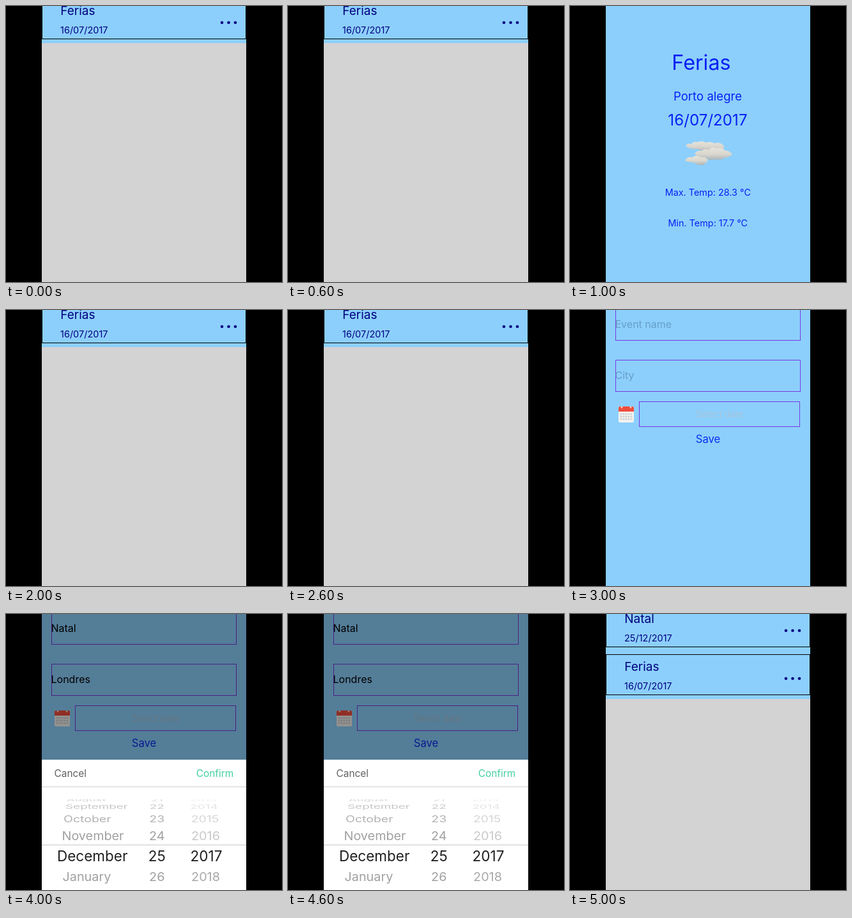
An HTML page for the animation above (6 s loop, 432x432 px).

```html
<!DOCTYPE html>
<html lang="en">
<head>
<meta charset="utf-8">
<title>Event weather app</title>
<style>
  html, body { margin: 0; width: 100%; height: 100%; overflow: hidden; background: #000; }
  svg { display: block; width: 100vw; height: 100vh; font-family: Inter, Roboto, sans-serif; }
</style>
</head>
<body>
<svg id="stage" viewBox="0 0 432 432">
  <defs>
    <clipPath id="phone"><rect x="56" width="320" height="432"/></clipPath>
    <clipPath id="wheel"><rect x="56" y="290" width="320" height="142"/></clipPath>
    <linearGradient id="puff" x1="0" y1="0" x2="0" y2="1">
      <stop offset="0" stop-color="#e6e3da"/>
      <stop offset="0.55" stop-color="#d9d6ce"/>
      <stop offset="1" stop-color="#a9b4ba"/>
    </linearGradient>
    <filter id="soft" x="-20%" y="-20%" width="140%" height="140%">
      <feGaussianBlur stdDeviation="0.7"/>
    </filter>
  </defs>
  <g id="screen" clip-path="url(#phone)"></g>
</svg>
<script>
const SKY = '#8ccffc', NAVY = '#000080', BLUE = '#0820f4';
const STEP = 1000;

const text = (str, x, y, size, fill, anchor = 'start') =>
  `<text x="${x}" y="${y}" font-size="${size}" fill="${fill}" text-anchor="${anchor}">${str}</text>`;

const rect = (x, y, w, h, fill, stroke = 'none') =>
  `<rect x="${x}" y="${y}" width="${w}" height="${h}" fill="${fill}" stroke="${stroke}"/>`;

const circle = (x, y, r, fill) => `<circle cx="${x}" cy="${y}" r="${r}" fill="${fill}"/>`;

function card([name, date], i) {
  const y = i * 75;
  const dots = [338, 348.5, 359].map(x => circle(x, y + 26, 2.3, NAVY)).join('');
  return rect(56.5, y - 11.5, 319, 63, 'none', '#000') +
    text(name, 85.3, y + 14, 19, NAVY) +
    text(date, 85, y + 43, 14.5, NAVY) + dots;
}

const list = events =>
  rect(56, 0, 320, 432, '#d3d3d3') +
  rect(56, 0, 320, 58 + 75 * (events.length - 1), SKY) +
  events.map(card).join('');

const cloud = `<g fill="url(#puff)" filter="url(#soft)">
  <path d="M181 219Q184 214 190 216Q193 211 200 213Q207 210 213 214Q220 211 226 215Q234 212 240 218Q244 224 236 226Q226 229 217 226Q207 229 200 224Q188 225 181 219Z"/>
  <path d="M180 242Q184 235 191 237Q197 232 204 235Q211 233 215 239Q217 243 212 246Q211 250 204 249Q198 249 194 245Q186 245 180 242Z"/>
  <path d="M195 231Q199 225 206 227Q210 222 217 225Q222 219 230 223Q238 220 242 226Q250 226 254 232Q250 237 242 237Q238 242 228 240Q218 243 211 237Q200 237 195 231Z"/>
</g>`;

const detail = () =>
  rect(56, 0, 320, 432, SKY) +
  text('Ferias', 205.5, 100, 32.4, BLUE, 'middle') +
  text('Porto alegre', 215.5, 148, 18.6, BLUE, 'middle') +
  text('16/07/2017', 215.5, 187, 24.2, BLUE, 'middle') +
  cloud +
  text('Max. Temp: 28.3 °C', 215.8, 297, 14.4, BLUE, 'middle') +
  text('Min. Temp: 17.7 °C', 215.8, 345, 14.4, BLUE, 'middle');

function calendar() {
  let cells = '';
  for (let i = 0; i < 15; i++)
    cells += rect(78.5 + (i % 5) * 4, 161.5 + Math.floor(i / 5) * 4, 2.8, 2.6, '#d0d2d3');
  return `<rect x="76" y="151" width="24" height="25" rx="2.5" fill="#f4f3ef"/>
    <path d="M76 159V153.5Q76 151 78.5 151H97.5Q100 151 100 153.5V159Z" fill="#f04c3c"/>` +
    circle(81, 152.3, 1.4, '#f6dcd8') + circle(95, 152.3, 1.4, '#f6dcd8') + cells;
}

function form(name, city, color) {
  const box = (x, y, w, h) => rect(x, y, w, h, 'none', '#7a38e0');
  return rect(56, 0, 320, 432, SKY) +
    box(71.5, -2.5, 289, 50) + box(71.5, 78.5, 289, 49) + box(108.5, 143.5, 251, 39) +
    text(name, 70.5, 28, 16, color) +
    text(city, 70.5, 108, 16, color) +
    text('Select date', 234, 168, 13.9, '#a9c3d6', 'middle') +
    calendar() +
    text('Save', 216, 208, 16.7, '#0a2cf0', 'middle');
}

// Wheel rows: month, day, year, month x, year centre, baseline, size, vertical squash, month and year tints
const rows = [
  ['August', 21, 2013, 95, 309, 293, 18.4, 0.28, '#d6d6d6', '#ececec'],
  ['September', 22, 2014, 93, 310, 304.5, 18.9, 0.5, '#c6c6c6', '#e4e4e4'],
  ['October', 23, 2015, 90, 311.5, 325.5, 19.5, 0.75, '#b2b2b2', '#d6d6d6'],
  ['November', 24, 2016, 87.5, 312.5, 354, 19.8, 0.95, '#a0a0a0', '#c8c8c8'],
  ['December', 25, 2017, 80, 313.5, 387, 22.5, 1, '#202020', '#202020'],
  ['January', 26, 2018, 88.5, 312.5, 417.5, 19.8, 0.95, '#a0a0a0', '#a8a8a8'],
  ['February', 27, 2019, 90, 311.5, 445, 19.5, 0.75, '#b2b2b2', '#b8b8b8']
];

const wheelRow = ([month, day, year, x, yearX, y, size, squash, tint, yearTint]) =>
  `<g transform="translate(0 ${y}) scale(1 ${squash})">` +
  text(month, x, 0, size, tint) +
  text(day, 236.3, 0, size, tint, 'middle') +
  text(year, yearX, 0, size, yearTint, 'middle') + '</g>';

const picker = () =>
  form('Natal', 'Londres', '#000') +
  '<rect x="56" width="320" height="228" opacity="0.4"/>' +
  rect(56, 228, 320, 204, '#fff') +
  rect(56, 270, 320, 1, '#cfcfcf') +
  text('Cancel', 75.6, 255, 15.4, '#606060') +
  text('Confirm', 356.3, 255, 15.4, '#42d0a0', 'end') +
  `<g clip-path="url(#wheel)">${rows.map(wheelRow).join('')}</g>` +
  rect(56, 361, 320, 1, '#c8c8c8');

const trip = ['Ferias', '16/07/2017'];
const xmas = ['Natal', '25/12/2017'];
const home = list([trip]);
const scenes = [
  home, detail(), home,
  form('Event name', 'City', '#669fca'),
  picker(),
  list([xmas, trip])
];

const screen = document.getElementById('screen');
screen.innerHTML = scenes.map(s => `<g>${s}</g>`).join('');
const layers = [...screen.children];
const start = performance.now();

function draw(now) {
  const active = Math.floor(Math.max(0, now - start) / STEP) % layers.length;
  layers.forEach((g, i) => g.setAttribute('display', i === active ? 'inline' : 'none'));
  requestAnimationFrame(draw);
}
draw(start);
</script>
</body>
</html>
```
